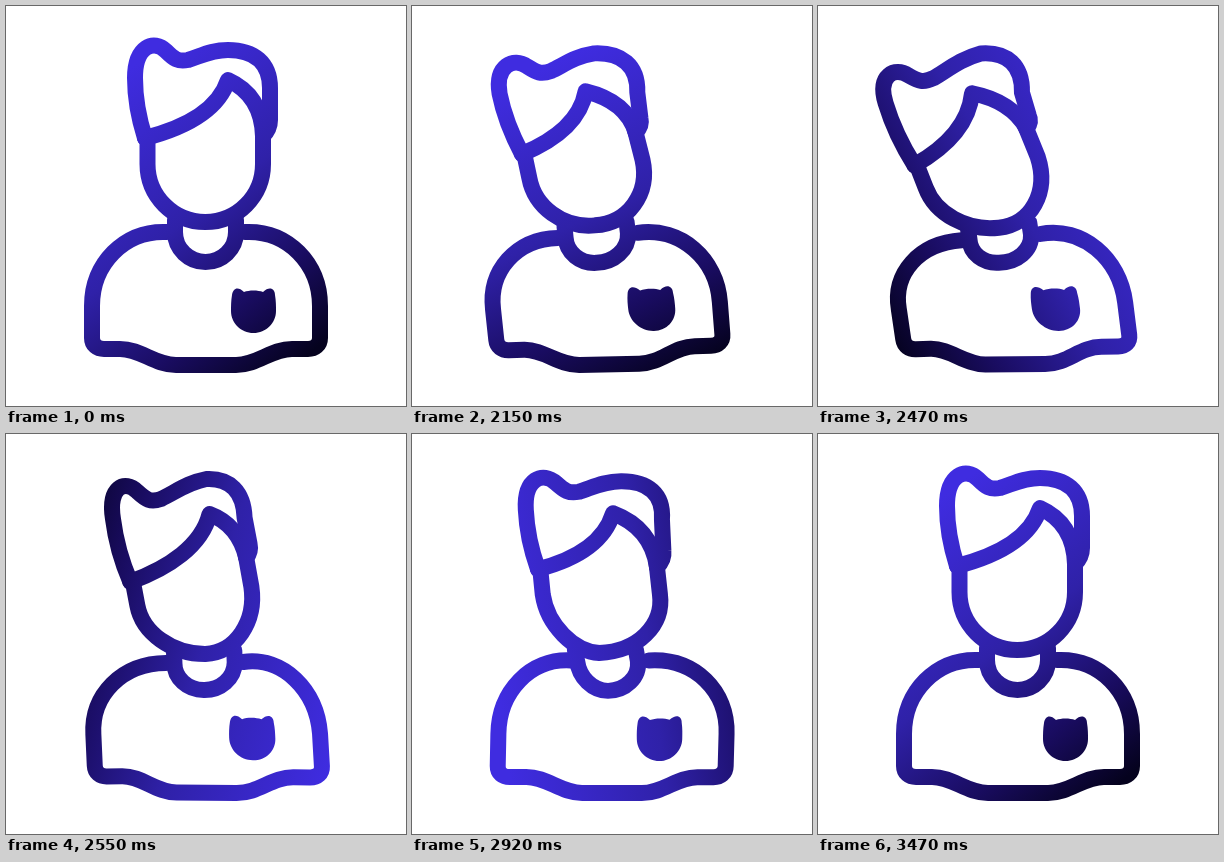
Recreate the animation shown at these times as an HTML page with a canvas. Size 400 px wide and 400 px high, loop 3.5 s.

```html
<!DOCTYPE html>
<html lang="en">
<head>
<meta charset="utf-8">
<style>
  html, body { margin: 0; width: 100%; height: 100%; overflow: hidden; background: #fff; }
  canvas { display: block; width: 400px; height: 400px; }
</style>
</head>
<body>
<canvas id="stage" width="400" height="400"></canvas>
<script>
const LOOP = 3500;
const ctx = document.getElementById('stage').getContext('2d');

const OUTLINES = [
  'M161 226 C118 224 86 258 86 300 L86 332 C86 339 91 343 98 343 L114 343 C135 343 148 359 170 359 L230 359 C252 359 265 343 286 343 L302 343 C309 343 314 339 314 332 L314 300 C314 258 282 224 239 226',
  'M169 214 L169 226 C169 243 183 256 199.5 256 C216 256 230 243 230 226 L230 214',
  'M141.5 132 L141.5 158 C141.5 190 167.3 216 199.3 216 C231.3 216 257 190 257 158 L257 125',
  'M139 132 C132 110 129 90 129 72 C129 40 148 33 160 45 C168 53 172 56 182 54 C195 50 205 44 222 44 C248 44 264 57 264 82 L264 114 C264 121 261 126 257 130',
  'M139 132 C178 122 212 105 222 74 C242 83 256 100 257 130'
].map(parse);
const BADGE = parse('M226 289 C227 282 232 280 238 286 C243 284 252 284 257 286 C263 280 269 282 269 289 C270 295 270 300 270 305 C270 317 260 327 247.5 327 C235 327 225 317 225 305 C225 300 225 295 226 289');

// Rest x, y, then offsets: lean left, swing back, overshoot right, rebound (x only)
const PINS = [
  [150, 41, -109, 42, -29, 13, 44, -5, -17],
  [129, 75, -97, 37, -22, 13, 40, -4, -15],
  [177, 55, -102, 28, -28, 12, 42, 4, -15],
  [222, 44, -95, 8, -22, 1, 36, 7, -13],
  [264, 80, -92, 10, -26, 2, 33, 12, -14],
  [222, 74, -115, 27, -19, 6, 58, 13, -21],
  [139, 132, -69, 38, -15, 16, 28, -2, -13],
  [257, 130, -79, -8, -17, -6, 29, 11, -12],
  [199, 216, -39, 8, 0, 4, 18, 3, -12],
  [199.5, 256, -36, 2, -2, 0, 18, 0, -3.5],
  [161, 226, -36, 14, -1, 3, 14, -3, -2],
  [239, 226, -32, 2, -2, 2, 16, 4, -2],
  [247.5, 305, -18, -5, -1.5, -1, 7, -1, 0],
  [86, 315, -8, 6, 2, 0, 9, 0, 0],
  [314, 315, -12, -9, 1, 0, 6, 0, 0],
  [200, 359, -7, -1, 0, 0, 4, 0, 0]
];
const POSE_TIMES = [1990, 2350, 2550, 2670, 2920, 3140, 3320, 3470];
const TRACKS = PINS.map(([, y, ax, ay, bx, by, cx, cy, dx]) => {
  const settle = y < 200 ? [0.4, -0.12] : [0, 0];
  return [
    [0, ax, bx, cx, dx, ...settle.map(s => s * cx), 0],
    [0, ay, by, cy, -dx / 4, ...settle.map(s => s * cy), 0]
  ];
});

const LIGHT_TIMES = [1990, 2350, 2550, 2670, 2920, 3080];
const LIGHT_ANGLE = [-38, 8, 105, 175, 262, 322];
const LIGHT_SHIFT = [0, 0, 0, 0, 35, 0];

function parse(d) {
  return d.match(/[MLC][^MLC]*/g).map(s => ({ op: s[0], nums: s.slice(1).trim().split(' ').map(Number) }));
}

// Monotone cubic interpolation: flat at extremes, smooth in between
function track(times, values, t) {
  const last = times.length - 1;
  if (t <= times[0]) return values[0];
  if (t >= times[last]) return values[last];
  const slope = i => (values[i + 1] - values[i]) / (times[i + 1] - times[i]);
  const tangent = i => {
    if (i === 0 || i === last) return 0;
    const a = slope(i - 1), b = slope(i);
    return a * b <= 0 ? 0 : 2 * a * b / (a + b);
  };
  let i = 0;
  while (t > times[i + 1]) i++;
  const h = times[i + 1] - times[i], u = (t - times[i]) / h, v = 1 - u;
  return v * v * (1 + 2 * u) * values[i] + u * u * (3 - 2 * u) * values[i + 1]
    + h * u * v * (v * tangent(i) - u * tangent(i + 1));
}

function solve(rows, size) {
  for (let c = 0; c < size; c++) {
    let best = c;
    for (let r = c + 1; r < size; r++) if (Math.abs(rows[r][c]) > Math.abs(rows[best][c])) best = r;
    [rows[c], rows[best]] = [rows[best], rows[c]];
    for (let r = 0; r < size; r++) {
      if (r === c) continue;
      const f = rows[r][c] / rows[c][c];
      for (let k = c; k < rows[r].length; k++) rows[r][k] -= f * rows[c][k];
    }
  }
  return rows.map((row, i) => row.slice(size).map(v => v / row[i]));
}

// Thin-plate spline through the pins
const kernel = (dx, dy) => {
  const q = (dx * dx + dy * dy) / 1e4;
  return q ? q * Math.log(q) : 0;
};
const basis = (x, y) => [...PINS.map(p => kernel(x - p[0], y - p[1])), 1, x / 100, y / 100];

function makeWarp(t) {
  const n = PINS.length;
  const rows = PINS.map((p, i) => [...basis(p[0], p[1]), ...TRACKS[i].map(v => track(POSE_TIMES, v, t))]);
  for (let k = 0; k < 3; k++) {
    rows.push([...rows.slice(0, n).map(r => r[n + k]), 0, 0, 0, 0, 0]);
  }
  const weights = solve(rows, n + 3);
  return (x, y) => {
    const b = basis(x, y);
    return [0, 1].map(axis => b.reduce((sum, v, i) => sum + v * weights[i][axis], axis ? y : x));
  };
}

function trace(path, warp) {
  ctx.beginPath();
  for (const { op, nums } of path) {
    const pts = [];
    for (let i = 0; i < nums.length; i += 2) pts.push(...warp(nums[i], nums[i + 1]));
    if (op === 'M') ctx.moveTo(...pts);
    else if (op === 'L') ctx.lineTo(...pts);
    else ctx.bezierCurveTo(...pts);
  }
}

function makePaint(t) {
  const a = track(LIGHT_TIMES, LIGHT_ANGLE, t) * Math.PI / 180;
  const shift = track(LIGHT_TIMES, LIGHT_SHIFT, t);
  const at = d => [200 + Math.sin(a) * (d - shift), 200 - Math.cos(a) * (d - shift)];
  const g = ctx.createLinearGradient(...at(-180), ...at(155));
  g.addColorStop(0, '#05021e');
  g.addColorStop(0.24, '#190c60');
  g.addColorStop(0.54, '#2f21a8');
  g.addColorStop(1, '#3f2ce0');
  return g;
}

function draw(t) {
  const warp = makeWarp(t);
  ctx.fillStyle = '#fff';
  ctx.fillRect(0, 0, 400, 400);
  ctx.fillStyle = ctx.strokeStyle = makePaint(t);
  ctx.lineWidth = 16;
  ctx.lineCap = ctx.lineJoin = 'round';
  for (const path of OUTLINES) {
    trace(path, warp);
    ctx.stroke();
  }
  trace(BADGE, warp);
  ctx.fill();
}

const start = performance.now();
function tick() {
  draw((performance.now() - start) % LOOP);
  requestAnimationFrame(tick);
}
tick();
</script>
</body>
</html>
```
